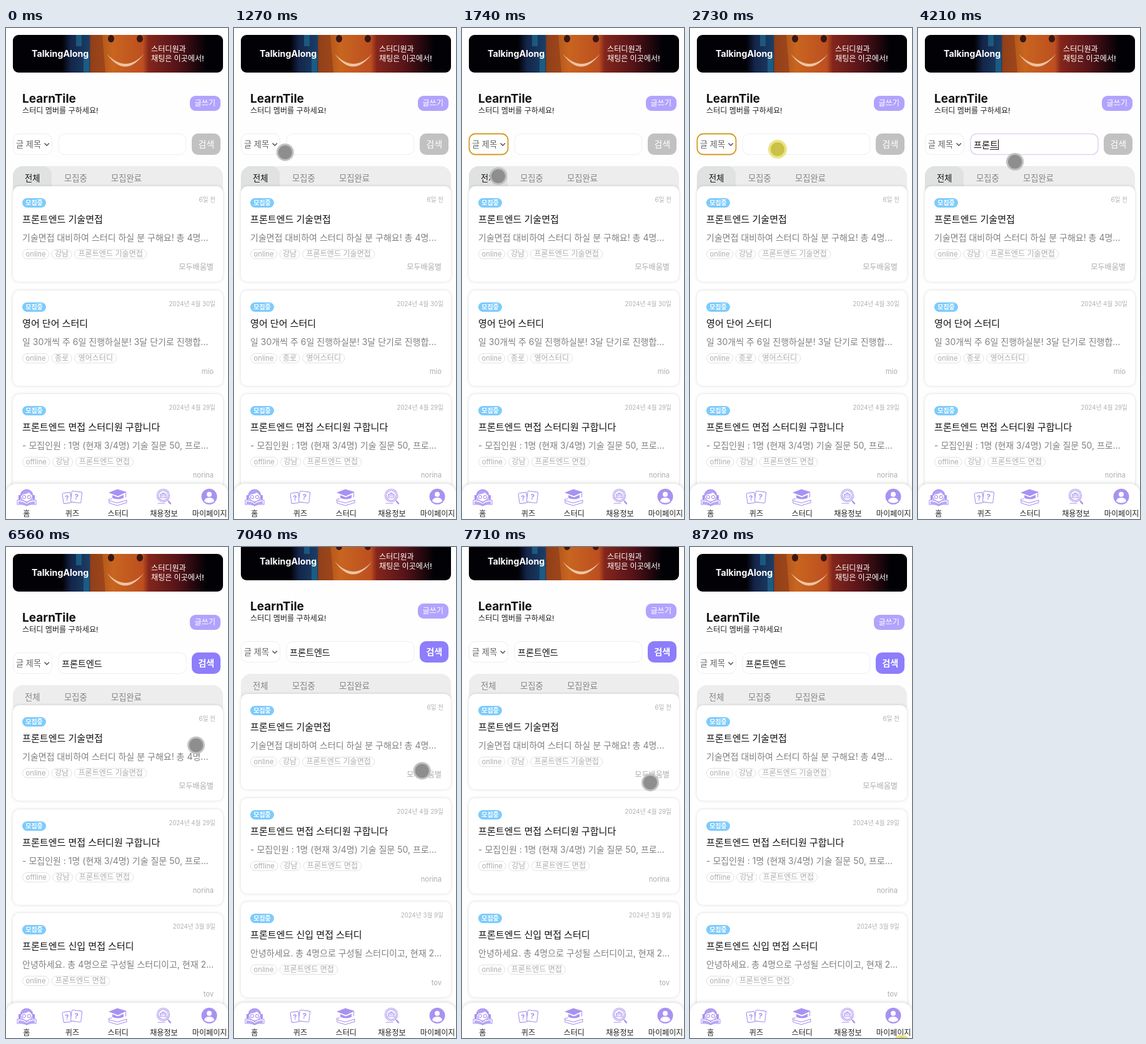
Animation of 355 by 782 pixels, one loop 8.86 s. Source, as an HTML page:

```html
<!DOCTYPE html>
<html lang="ko">
<head>
<meta charset="utf-8">
<style>
html, body { margin: 0; width: 100%; height: 100%; overflow: hidden; background: #fefefe; }
svg { display: block; width: 355px; height: 782px; }
text { font-family: Inter, "Noto Sans CJK KR", "Noto Sans CJK", sans-serif; white-space: pre; }
.card { fill: #fff; filter: drop-shadow(0 0 2px rgba(0,0,0,.15)); }
.nav { fill: #fff; filter: drop-shadow(0 -1px 3px rgba(0,0,0,.15)); }
.line { fill: none; stroke: #a892ef; stroke-width: 1.1; stroke-linecap: round; stroke-linejoin: round; }
.solid { fill: #a892f2; }
</style>
</head>
<body>
<svg id="stage" viewBox="0 0 355 782" xmlns="http://www.w3.org/2000/svg"></svg>
<script>
const LOOP = 8860;

// Text placed by the middle of its line
function text(str, x, mid, size, color, weight = 400, anchor = 'start', id = '') {
  return `<text ${id && `id="${id}"`} x="${x}" y="${Math.round(mid + size * 0.37)}" font-size="${size}" ` +
    `fill="${color}" font-weight="${weight}" text-anchor="${anchor}">${str}</text>`;
}

function box(x, y, w, h, r, attrs) {
  return `<rect x="${x}" y="${y}" width="${w}" height="${h}" rx="${r}" ${attrs}/>`;
}

const latin = s => /^[a-z]+$/.test(s);
const smallSize = s => latin(s) ? 11.2 : 12.1;

function tags(list, mid) {
  let x = 26;
  return list.map(([label, w]) => {
    const pill = box(x + .5, mid - 7.5, w - 1, 15, 7.5, 'fill="#fff" stroke="#e2e2e2"') +
      text(label, x + w / 2, mid, smallSize(label), '#adadad', 400, 'middle');
    x += w + 3.6;
    return pill;
  }).join('');
}

function card(c, i) {
  const y = Math.round(252 + i * 165.6);
  return box(11, y, 336, 152, 10, 'class="card"') +
    box(26, y + 19, 38, 15, 7.5, 'fill="#7dcbfc"') +
    text('모집중', 45, y + 26.5, 10, '#fff', 700, 'middle') +
    text(c.date, 335, y + 21.3, 9.7, '#b0b0b0', 400, 'end') +
    text(c.title, 26, y + 52, 15.1, '#111', 500) +
    text(c.body, 26, y + 82, 14, '#808080') +
    tags(c.tags, y + 108) +
    text(c.author, 332, y + 128.7, smallSize(c.author), '#adadad', 400, 'end');
}

const ON = ['online', 43], OFF = ['offline', 44.5], GN = ['강남', 33];
const tech = {
  date: '6일 전', title: '프론트엔드 기술면접',
  body: '기술면접 대비하여 스터디 하실 분 구해요! 총 4명...',
  tags: [ON, GN, ['프론트엔드 기술면접', 116]], author: '모두배움별'
};
const words = {
  date: '2024년 4월 30일', title: '영어 단어 스터디',
  body: '일 30개씩 주 6일 진행하실분! 3달 단기로 진행합...',
  tags: [ON, ['종로', 33], ['영어스터디', 68]], author: 'mio'
};
const interview = {
  date: '2024년 4월 29일', title: '프론트엔드 면접 스터디원 구합니다',
  body: '- 모집인원 : 1명 (현재 3/4명) 기술 질문 50, 프로...',
  tags: [OFF, GN, ['프론트엔드 면접', 93.5]], author: 'norina'
};
const junior = {
  date: '2024년 3월 9일', title: '프론트엔드 신입 면접 스터디',
  body: '안녕하세요. 총 4명으로 구성될 스터디이고, 현재 2...',
  tags: [ON, ['프론트엔드 면접', 93.5]], author: 'tov'
};

function banner() {
  return `<g clip-path="url(#bannerClip)">
    <rect x="11" y="11" width="336" height="60" fill="#020106"/>
    <rect x="90" y="11" width="230" height="60" fill="url(#photo)"/>
    <path d="M112 11h9v18h-9zM124 42h9v29h-9z" fill="#1d6a92" opacity=".7"/>
    <path d="M134 11h20l5 60h-25z" fill="#8a3a18" opacity=".6"/>
    <ellipse cx="168" cy="17" rx="5" ry="6" fill="#3a1712"/>
    <ellipse cx="214" cy="17" rx="5" ry="6" fill="#3a1712"/>
    <path d="M161 41Q190 82 221 41Q191 73 161 41Z" fill="#eec3a4"/>
  </g>` +
    text('TalkingAlong', 41, 41, 14.2, '#fff', 700) +
    text('스터디원과', 232, 34, 12.1, '#fff', 500) +
    text('채팅은 이곳에서!', 232, 49, 12.1, '#fff', 500);
}

function header() {
  return text('LearnTile', 26, 112, 19, '#111', 700) +
    text('스터디 멤버를 구하세요!', 26, 132, 12.1, '#222') +
    box(294, 108, 49, 24, 9, 'fill="#b1a3fd"') +
    text('글쓰기', 318.2, 119.8, 12.2, '#fff', 400, 'middle');
}

function search() {
  return box(11.5, 168.5, 62, 33, 10, 'id="select" fill="#fff"') +
    text('글 제목', 16, 185, 13.2, '#666') +
    '<path d="M61.5 183.5l3.7 3.7 3.7-3.7" fill="none" stroke="#555" stroke-width="1.6"/>' +
    box(84, 168.5, 204, 33, 10, 'id="input" fill="#fff"') +
    text('', 89, 185.3, 14.1, '#111', 400, 'start', 'typed') +
    '<path id="under" stroke="#222"/><path id="caret" stroke="#111"/>' +
    box(297, 168, 46, 34, 10, 'id="button"') +
    text('검색', 320.2, 185, 14.1, '#fff', 500, 'middle', 'buttonText');
}

function tabs() {
  return '<path d="M11 262V236a16 16 0 0 1 16-16H331a16 16 0 0 1 16 16V262z" fill="#ededed"/>' +
    '<path id="tab" d="M11 262V236a16 16 0 0 1 16-16H59a14 14 0 0 1 14 14V262z" fill="#e0e1e1"/>' +
    text('전체', 30, 239, 13.3, '#111', 400, 'start', 'tabText') +
    text('모집중', 93, 239, 13.3, '#858585') +
    text('모집완료', 168, 239, 13.3, '#858585');
}

function quizCard(x, y, w, h, turn) {
  return `<g transform="translate(${x} ${y}) rotate(${turn})">` +
    box(-w / 2, -h / 2, w, h, 1.5, 'class="line" style="fill:#fff"') +
    text('?', 0, 0, h * .68, '#a892f2', 700, 'middle') + '</g>';
}

function nav() {
  const home = `<circle class="line" cx="33" cy="745" r="9.5"/>
    <path class="solid" d="M22.500 745a10.500 10.500 0 0 1 21 0l-3-1q-2-3-4-4-5 3-10 3l-1 2z" opacity=".85"/>
    <path class="solid" d="M20 744h3.500v7h-3.500zM42.500 744h3.500v7h-3.500z"/>
    <circle class="line" cx="29" cy="747" r="2.500"/><circle class="line" cx="37" cy="747" r="2.500"/>
    <path class="line" style="fill:#fff" d="M18 752q10-1 15 4q5-5 15-4v7q-10-1-15 2q-5-3-15-2z"/>
    <path class="solid" d="M20 754q8 0 13 4q5-4 13-4v4q-8 0-13 3q-5-3-13-3z" opacity=".8"/>`;
  const quiz = quizCard(97.5, 748.5, 13, 16.5, -8) + quizCard(112.5, 747, 16.5, 17.5, 7);
  const study = `<path class="solid" d="M164 740l14-5.500 15 4.500-14 6.500zM170 744l9 3.500 9-4v5q-9 4-18 0z"/>
    <path class="line" d="M191.500 740v7M169 750q-6 0-5 2.500l14 4 15-4.500M165 754q-1 2 1 3l12 3.500 15-4.500v-4"/>`;
  const jobs = `<circle class="line" cx="251.500" cy="744.500" r="10"/><circle class="line" cx="251.500" cy="744.500" r="7.800" stroke-width=".7"/>
    <path class="line" d="M247 742.500h9v5.500h-9zM250 742v-1.500h3v1.500M247 745h9M258.500 752l5 5.500M243 757h11"/>
    <path class="line" style="stroke-width:2.400" d="M260 754l3 3.500"/>`;
  const me = `<circle class="solid" cx="325" cy="746.300" r="12.500"/><circle cx="325" cy="742.800" r="4" fill="#fff"/>
    <path d="M317 753.500q1-5.500 8-5.500t8 5.500q-3 3-8 3t-8-3z" fill="#fff"/>`;
  const labels = ['홈', '퀴즈', '스터디', '채용정보', '마이페이지'];
  return '<path class="nav" d="M0 790V742a16 16 0 0 1 16-16H339a16 16 0 0 1 16 16V790z"/>' +
    home + quiz + study + jobs + me +
    labels.map((s, i) => text(s, 32.8 + i * 73.2, 773.5, 12.1, '#222', 400, 'middle')).join('');
}

document.getElementById('stage').innerHTML = `
  <defs>
    <clipPath id="bannerClip"><rect x="11" y="11" width="336" height="60" rx="9"/></clipPath>
    <linearGradient id="photo">
      <stop offset="0" stop-color="#020106"/><stop offset=".06" stop-color="#14254a"/>
      <stop offset=".19" stop-color="#1b3f66"/><stop offset=".2" stop-color="#a04a1a"/>
      <stop offset=".35" stop-color="#c8651f"/><stop offset=".56" stop-color="#bd4f20"/>
      <stop offset=".6" stop-color="#84261c"/><stop offset=".8" stop-color="#551319"/>
      <stop offset="1" stop-color="#020106"/>
    </linearGradient>
  </defs>
  <rect width="355" height="782" fill="#fefefe"/>
  <g id="page">${banner()}${header()}${search()}${tabs()}
    <g id="all">${[tech, words, interview].map(card).join('')}</g>
    <g id="found">${[tech, interview, junior].map(card).join('')}</g>
  </g>
  ${nav()}
  <g id="pointer"><circle id="halo"/><circle id="dot" r="11"/></g>`;

const el = id => document.getElementById(id);
const set = (id, attrs) => { for (const k in attrs) el(id).setAttribute(k, attrs[k]); };
const show = (id, on) => set(id, { visibility: on ? 'visible' : 'hidden' });
const within = (t, a, b) => t >= a && t < b;

// time, x, y
const path = [
  [130, 303, 734], [200, 250, 560], [330, 120, 250], [430, 62, 111], [540, 72, 160], [660, 110, 222],
  [1070, 110, 222], [1270, 82, 198], [1420, 46, 187], [1560, 46, 187], [1740, 58, 236],
  [2330, 58, 236], [2600, 112, 212], [2720, 140, 193], [2810, 140, 193], [3000, 155, 213],
  [5280, 155, 213], [5345, 340, 317], [5410, 328, 250], [5610, 328, 250], [5740, 320, 187],
  [5900, 320, 187], [6230, 307, 292], [6410, 307, 292], [6560, 304, 315], [6690, 302, 410],
  [6900, 300, 345], [7110, 301, 362], [7640, 301, 362], [7710, 301, 375], [7840, 302, 392],
  [8050, 310, 470], [8460, 331, 755], [8530, 332, 757], [8720, 338.5, 792]
];
const presses = [[1420, 1560], [2680, 2820], [5740, 5880], [6690, 6900], [7840, 8050], [8620, LOOP]];
const typing = [
  [3620, 'ㅍ'], [3710, '플'], [3800, '프로'], [3950, '프론'], [4080, '프론ㅌ'], [4210, '프론트'],
  [4410, '프론틍'], [4500, '프론트에'], [4580, '프론트엔'], [4670, '프론트엔ㄷ'], [4750, '프론트엔드']
];

function pointerAt(t) {
  const n = path.findIndex(p => p[0] > t);
  if (n < 0) return path[path.length - 1].slice(1);
  const a = path[Math.max(n - 1, 0)], b = path[n];
  const k = Math.max(0, (t - a[0]) / (b[0] - a[0] || 1));
  return [a[1] + (b[1] - a[1]) * k, a[2] + (b[2] - a[2]) * k];
}

const ramp = (t, a, b) => {
  const k = Math.min(1, Math.max(0, (t - a) / (b - a)));
  return k * k * (3 - 2 * k);
};

function render(t) {
  const found = t >= 5940, picked = within(t, 1440, 2810), focus = within(t, 2850, 5750);
  const scroll = Math.round(18 * (ramp(t, 6700, 6900) - ramp(t, 7850, 8030)));
  set('page', { transform: `translate(0 ${-scroll})` });
  show('all', !found);
  show('found', found);
  show('tab', !found);
  set('tabText', { fill: found ? '#858585' : '#111' });
  set('select', { stroke: picked ? '#d29c20' : '#eeecf2', 'stroke-width': picked ? 1.8 : 1 });
  set('input', { stroke: focus ? '#e5d3f3' : '#eeecf4', 'stroke-width': focus ? 1.6 : 1 });
  set('button', { fill: found ? '#8e7dfc' : '#c1c1c1' });
  set('buttonText', { 'font-weight': found ? 700 : 500 });

  const typed = typing.reduce((s, k) => t >= k[0] ? k[1] : s, '');
  const end = 89 + 13 * typed.length;
  el('typed').textContent = typed;
  set('caret', { d: `M${end + .5} 177.500V194` });
  set('under', { d: `M${end - 13} 193.500H${end}` });
  show('caret', within(t, 2850, 3350) || within(t, 3620, 5280));
  show('under', typed && focus);

  const [x, y] = pointerAt(t);
  const down = presses.some(p => within(t, p[0], p[1]));
  set('pointer', { transform: `translate(${x} ${y})` });
  show('pointer', t >= 130);
  set('halo', { r: down ? 15 : 14, fill: down ? '#e9e27c' : '#bcbcbc', 'fill-opacity': .92 });
  set('dot', { fill: down ? '#c6bf42' : '#8a8a8a', 'fill-opacity': .92 });
}

const start = performance.now();
function tick() {
  render((performance.now() - start) % LOOP);
  requestAnimationFrame(tick);
}
tick();
</script>
</body>
</html>
```
